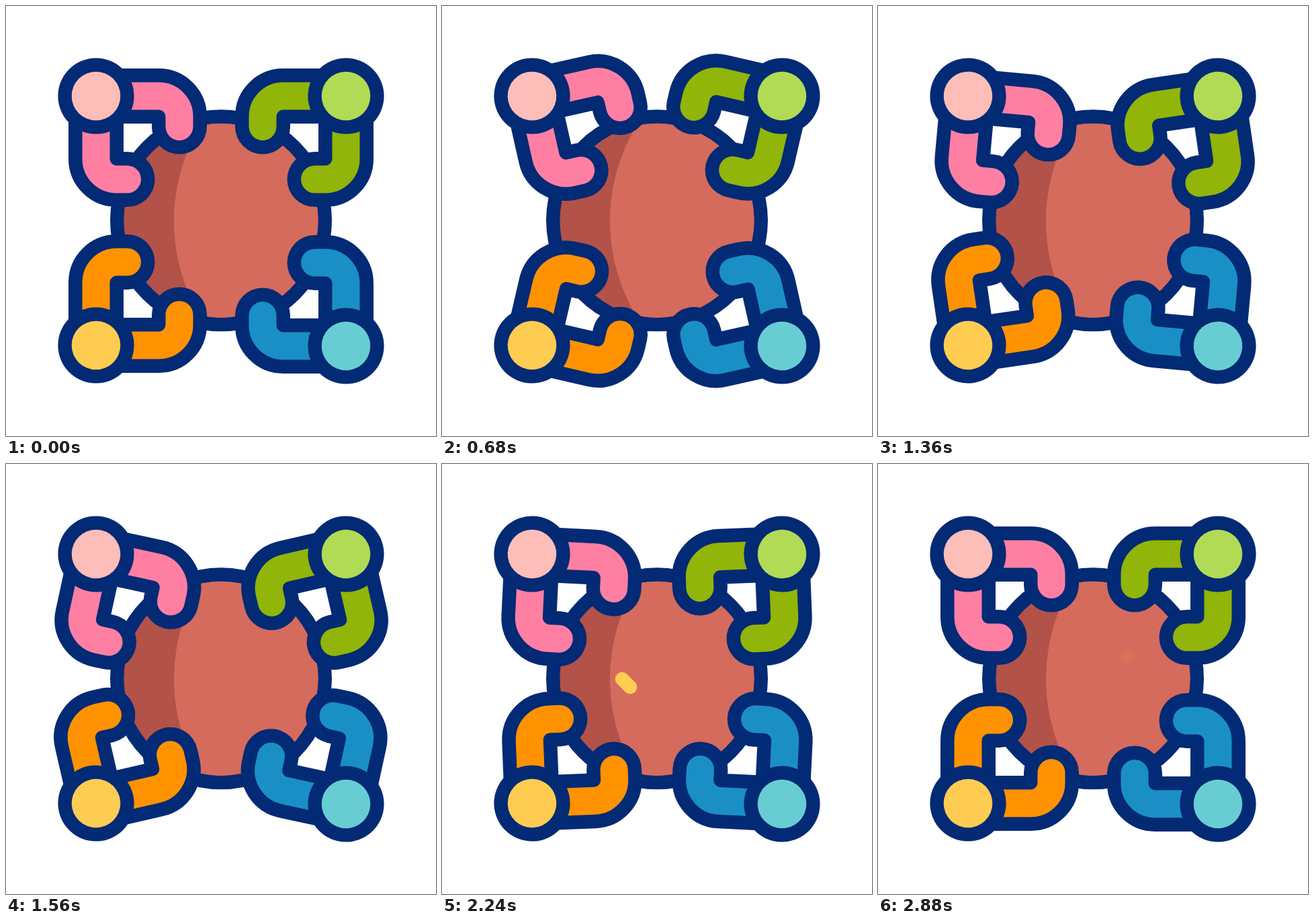
These frames come from a looping animation (640x640 px, 3 s). An HTML page with a canvas:

```html
<!DOCTYPE html>
<html lang="en">
<head>
<meta charset="utf-8">
<title>Round table</title>
<style>
  html, body { margin: 0; width: 100%; height: 100%; overflow: hidden; background: #fff; }
  canvas { display: block; width: 100vw; height: 100vh; object-fit: contain; }
</style>
</head>
<body>
<canvas id="stage" width="640" height="640"></canvas>
<script>
const ctx = document.getElementById('stage').getContext('2d');
const LOOP = 3000, STEP = 40, LAST = 2880;
const OUTLINE = '#032a75', LINE = 20.5;
const SWING = 13.3 * Math.PI / 180;

// Key times: start, fully inward, fully outward, back at rest
const LATE = [200, 815, 1760, 2530];
const EARLY = [180, 775, 1690, 2537];

const people = [
  { x: 134, y: 134, sx: 1, sy: 1, keys: LATE, arm: '#ff7fa3', head: '#fdbdb8' },
  { x: 506, y: 134, sx: -1, sy: 1, keys: EARLY, arm: '#91b508', head: '#b1db54' },
  { x: 134, y: 505, sx: 1, sy: -1, keys: EARLY, arm: '#ff9200', head: '#ffcc52' },
  { x: 506, y: 506, sx: -1, sy: -1, keys: LATE, arm: '#1a8fc6', head: '#68cdd2' }
];

const progress = (t, from, to) => Math.min(1, Math.max(0, (t - from) / (to - from)));
const easeCubic = u => u < 0.5 ? 4 * u ** 3 : 1 - 4 * (1 - u) ** 3;
const easeSine = u => (1 - Math.cos(Math.PI * u)) / 2;

function swingAngle(t, [start, inward, outward, end]) {
  const move = (from, to) => easeCubic(progress(t, from, to));
  return SWING * (-move(start, inward) + 2 * move(inward, outward) - move(outward, end));
}

function disc(x, y, r, color) {
  ctx.beginPath();
  ctx.arc(x, y, r, 0, 2 * Math.PI);
  ctx.fillStyle = color;
  ctx.fill();
}

function drawTable() {
  disc(320, 319.3, 165, OUTLINE);
  disc(320, 319.3, 144.6, '#b35248');
  ctx.save();
  ctx.clip();
  disc(526, 320, 276, '#d56b5c');
  ctx.restore();
}

function strokePath(path, width, color) {
  ctx.lineWidth = width;
  ctx.strokeStyle = color;
  ctx.stroke(path);
}

const arms = new Path2D();
arms.moveTo(124, 45.5);
arms.arcTo(124, 0, 94, 0, 30.5);
arms.lineTo(0, 0);
arms.arcTo(0, 124, 30, 124, 30.5);
arms.lineTo(46.5, 124);

function drawPerson(p, t) {
  ctx.save();
  ctx.translate(p.x, p.y);
  ctx.scale(p.sx, p.sy);
  ctx.rotate(swingAngle(t, p.keys));
  strokePath(arms, 41 + 2 * LINE, OUTLINE);
  strokePath(arms, 41, p.arm);
  disc(0, 0, 56.6, OUTLINE);
  disc(0, 0, 36.3, p.head);
  ctx.restore();
}

// Check mark: one leg down to the corner, one leg up; both at 45 degrees
const mark = { left: 268, corner: 302.5, right: 371, bottom: 354.5 };

function drawCheck(t) {
  if (t <= 2160) return;
  const along = u => mark.left + u * (mark.right - mark.left);
  const height = x => mark.bottom - Math.abs(x - mark.corner);
  const from = along(easeSine(progress(t, 2560, 2880)));
  const to = along(easeSine(progress(t, 2160, 2520)));
  ctx.save();
  ctx.globalAlpha = 1 - 0.92 * progress(t, 2800, 2880);
  const path = new Path2D();
  path.moveTo(from, height(from));
  if (from < mark.corner && to > mark.corner) path.lineTo(mark.corner, mark.bottom);
  path.lineTo(to + 0.01, height(to));
  strokePath(path, LINE, '#ffcc52');
  ctx.restore();
}

function draw(now) {
  const t = Math.min(LAST, Math.floor((now % LOOP) / STEP) * STEP);
  ctx.fillStyle = '#fff';
  ctx.fillRect(0, 0, 640, 640);
  ctx.lineCap = ctx.lineJoin = 'round';
  drawTable();
  drawCheck(t);
  people.forEach(p => drawPerson(p, t));
}

let origin;
function tick(now) {
  origin ??= now;
  draw(now - origin);
  requestAnimationFrame(tick);
}
draw(0);
requestAnimationFrame(tick);
</script>
</body>
</html>
```
